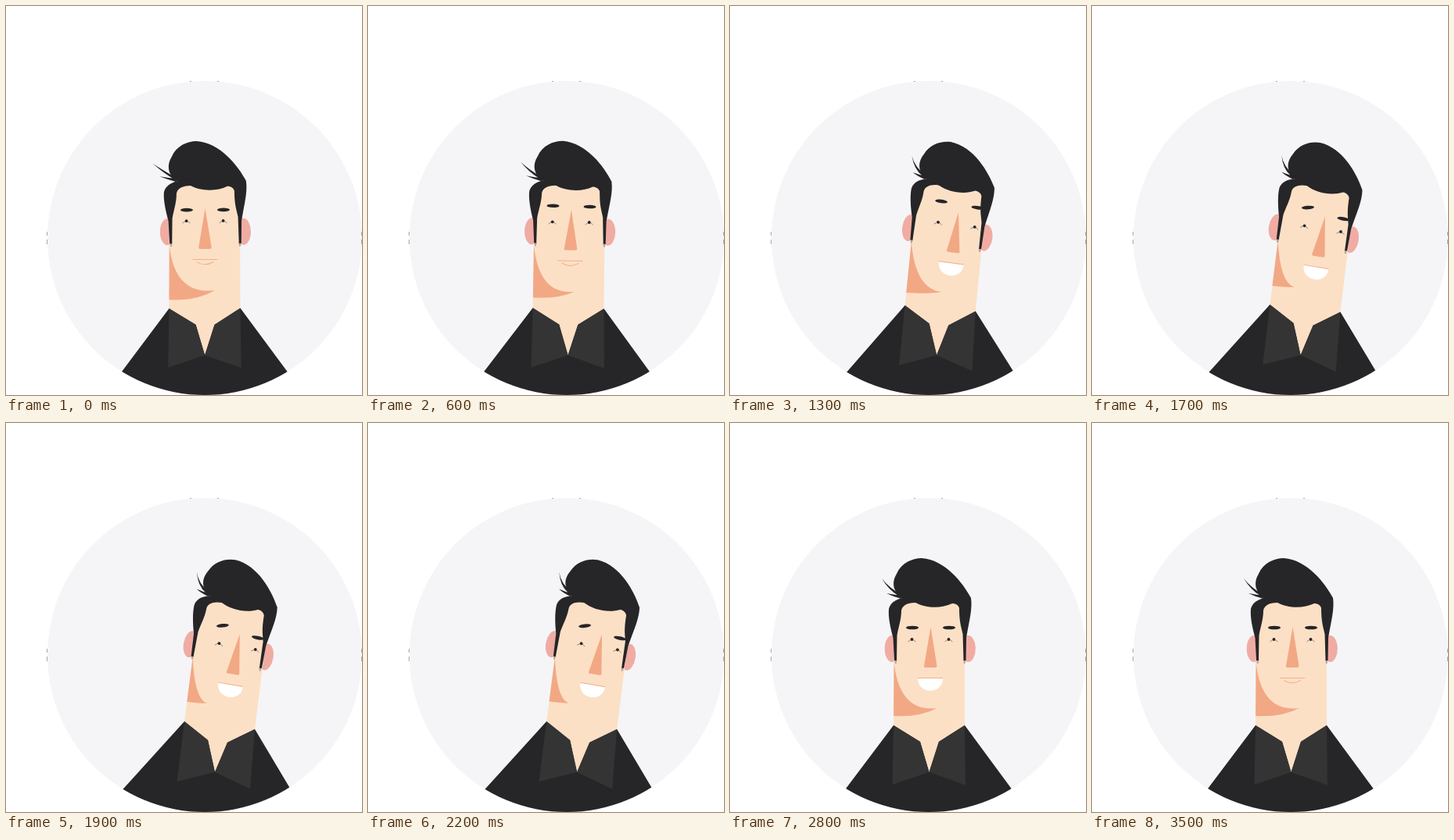
An HTML page for the animation above (4.1 s loop, 455 by 498 pixels).

```html
<!DOCTYPE html>
<html lang="en">
<head>
<meta charset="utf-8">
<title>Leaning portrait</title>
<style>
  html, body { margin: 0; width: 100%; height: 100%; overflow: hidden; background: #fff; }
  svg { display: block; width: 455px; height: 498px; }
  .dark { fill: #262528; }
  .collar { fill: #343434; }
  .skin { fill: #fce0c5; }
  .shade { fill: #f2a885; }
  .ear { fill: #f0aca3; }
  .lip { fill: none; stroke: #f0b08e; stroke-width: 1; }
  .lash { fill: none; stroke: #77706c; stroke-width: .8; }
  .mark { fill: none; stroke: #a9a9ad; stroke-width: 1; }
</style>
</head>
<body>
<svg viewBox="0 0 455 498">
  <defs>
    <clipPath id="disc"><circle cx="254" cy="297" r="201"/></clipPath>
    <g id="eye">
      <path class="lash" d="M-1 0L-5 3M1 0L5 3"/>
      <circle class="dark" r="1.9"/>
    </g>
    <ellipse id="ear" class="ear" rx="9.3" ry="17"/>
    <path id="burn" fill="#b5a39a" d="M0 0h3.5l-1 5h-1.5z"/>
  </defs>
  <circle cx="254" cy="297" r="201" fill="#f5f5f8"/>
  <path class="mark" d="M52.5 289v5m0 5v6M454.5 289v5m0 5v6M235 96.5h2M270 96.5h2"/>
  <g clip-path="url(#disc)">
    <g class="head">
      <use href="#ear" x="207" y="289"/>
      <use href="#ear" x="304.5" y="289"/>
    </g>
    <path class="skin" id="skin"/>
    <path class="shade" id="shade"/>
    <path class="dark" id="shirt"/>
    <path class="collar" id="flapL"/>
    <path class="collar" id="flapR"/>
    <g class="head">
      <use href="#burn" x="210" y="303"/>
      <use href="#burn" x="298" y="303"/>
      <path class="dark" d="M220 224C207 215 207 203 213 193C219 179 233 173 245 173
        C275 175 298 205 308 224C310 238 306 252 302 275L301.5 304H298.5L297.5 270
        C296 262 293 256 293 237C292 233 288 231 284 231C270 238 250 237 237 230Z"/>
      <path class="dark" d="M237 230C226 230 220 234 219 240C219 252 215 262 213.5 272
        L213 304H210L208.5 275C205 262 202 248 203 238C205 230 212 226 220 224L240 222Z"/>
      <path class="dark" id="tuft"/>
      <ellipse class="dark" id="browL" rx="8" ry="2.3"/>
      <ellipse class="dark" id="browR" rx="8" ry="2.3"/>
      <g id="face">
        <use href="#eye" x="232.5" y="277"/>
        <use href="#eye" x="279.5" y="277"/>
        <path class="shade" d="M256.5 261L264.5 311Q264.5 313 262.5 313H250Q247.5 313 248 311Z"/>
        <path id="teeth" fill="#fff"/>
        <path class="lip" d="M240 326.5H272"/>
        <path class="lip" id="grin" d="M245 329.5Q256 336 267 329.5"/>
      </g>
    </g>
  </g>
</svg>
<script>
const LOOP = 4100, STEP = 100;
const $ = id => document.getElementById(id);
const heads = document.querySelectorAll('.head');

// lean, face x, face y, left brow, right brow, tuft, jaw y, chin x, chin y
const idle = [-.03, -1, -2, -1, -1, -5, 376, 267, 364];
const glance = [.18, 2, 1, -10, -9, -1, 371, 261, 367];
const raise = [.77, 10, 0, -12, -10, 4, 367, 271, 366];
const nodded = [1.01, 10, 5, -3, 5, 5, 356.5, 256, 358.5];
const back = [.53, 6.5, 1.5, -2.5, 2, 4, 367, 263, 365];
const rest = [0, 0, 0, 0, 0, 0, 375, 265, 365];

const linear = k => k;
const easeIn = k => k ** 1.5;
const easeOut = k => 1 - (1 - k) ** 2;
const settle = k => 1 - (1 - k) ** 3;

// end time, pose reached, easing
const MOVES = [
  [200, idle, linear], [800, glance, easeIn], [1300, raise, linear],
  [2200, nodded, settle], [2400, nodded, linear], [2500, back, linear],
  [2800, rest, easeOut], [LOOP, rest, linear]
];

const mix = (a, b, k) => a + (b - a) * k;
const ramp = (t, from, to) => Math.min(1, Math.max(0, (t - from) / (to - from)));

function poseAt(t) {
  const i = MOVES.findIndex(move => move[0] > t);
  const [end, pose, ease] = MOVES[i];
  const [begin, prev] = i ? MOVES[i - 1] : [0, idle];
  const k = ease(ramp(t, begin, end));
  return prev.map((v, n) => mix(v, pose[n], k));
}

const poly = (...pts) => 'M' + pts.map(p => p.join(' ')).join('L') + 'Z';
const shape = (id, d) => $(id).setAttribute('d', d);
const place = (id, transform) => $(id).setAttribute('transform', transform);

function draw(t) {
  const [lean, fx, fy, browL, browR, tuft, jawY, chinX, chinY] = poseAt(t);
  const smile = ramp(t, 900, 1300) - ramp(t, 3000, 3400);
  const deg = 9.7 * lean, rad = deg * Math.PI / 180;
  const sin = Math.sin(rad), cos = Math.cos(rad);
  const turn = (x, y) => [
    256 + (x - 256) * cos - (y - 458) * sin,
    458 + (x - 256) * sin + (y - 458) * cos
  ];
  const sway = (x, y, dx, dy) => [x + dx * lean, y + dy * lean];

  // The torso follows the lean less than the head does
  const neckL = sway(209, 387, 19, -5), neckR = sway(300, 387, 18, 5);
  const foldL = sway(243, 408, 15, -2), foldR = sway(267, 408, 16, 1);
  const vee = sway(254.5, 447, 12.5, 0);
  const armL = sway(118, 508, -4, 0), armR = sway(389, 508, -2, 0);
  const cheekL = turn(210, 250);

  shape('skin', poly(turn(218, 228), turn(294, 228), turn(300, 250), neckR, vee, neckL, cheekL));
  shape('shirt', poly(armL, neckL, foldL, vee, foldR, neckR, armR));
  shape('flapL', poly(neckL, foldL, vee, sway(207.5, 463, 11, -4)));
  shape('flapR', poly(neckR, foldR, vee, sway(301, 463.5, 11, 5)));

  const edgeX = y => mix(cheekL[0], neckL[0], (y - cheekL[1]) / (neckL[1] - cheekL[1]));
  const topY = 306 - 6 * lean, topX = edgeX(topY), jawX = edgeX(jawY);
  shape('shade',
    `M${topX} ${topY}L${jawX} ${jawY}Q${(jawX + chinX) / 2 + 5} ${jawY + 2} ${chinX} ${chinY}` +
    `Q${mix(topX, chinX, .12)} ${chinY + 6 - 12 * lean} ${topX} ${topY}Z`);

  const tip = `${194 + tuft} ${199 - tuft / 2}`, wisp = `${200 + tuft / 2} 218`;
  shape('tuft', `M${tip}Q203 211 221 221H215Q203 214 ${tip}Z` +
    `M${wisp}Q210 220 221 221L219 225Q208 222 ${wisp}Z`);

  const nod = Math.max(0, fy) / 5;
  place('browL', `translate(${233 + fx} ${262 + browL}) rotate(${-16 * nod})`);
  place('browR', `translate(${280 + fx} ${262 + browR}) rotate(${2 * nod})`);
  place('face', `translate(${fx} ${fy})`);

  const depth = 327 + 21 * smile;
  shape('teeth', `M240 327H272C272 ${depth} 240 ${depth} 240 327Z`);
  $('grin').setAttribute('opacity', Math.max(0, 1 - 2 * smile));
  heads.forEach(head => head.setAttribute('transform', `rotate(${deg} 256 458)`));
}

const start = performance.now();
function tick() {
  const t = Math.max(0, performance.now() - start) % LOOP;
  draw(Math.floor(t / STEP) * STEP);
  requestAnimationFrame(tick);
}
tick();
</script>
</body>
</html>
```
